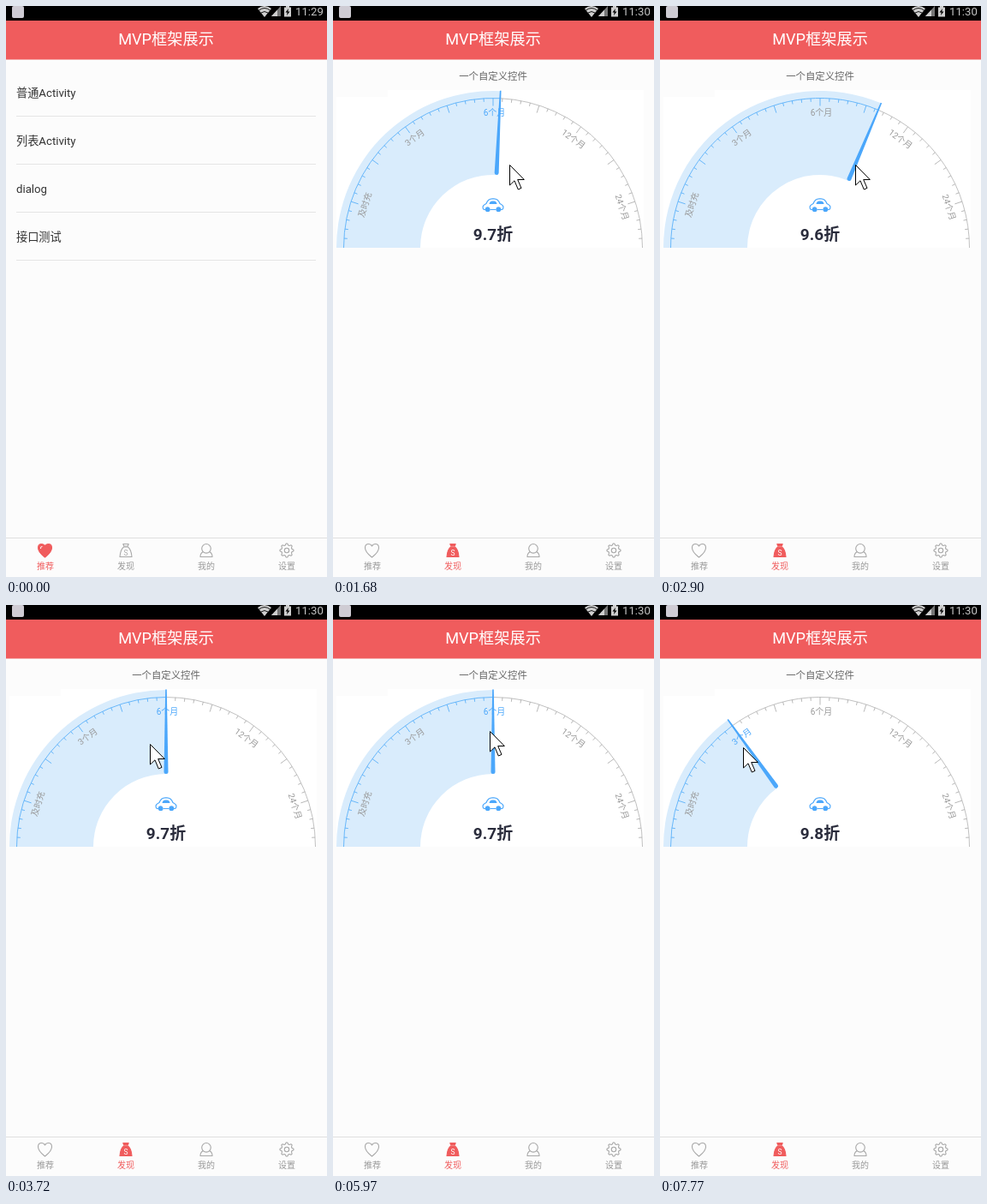
An HTML page for the animation above (8000 ms loop, 375 px wide and 666 px high).

```html
<!DOCTYPE html>
<html lang="zh-CN">
<head>
<meta charset="utf-8">
<title>MVP框架展示</title>
<style>
  html, body { margin: 0; width: 100%; height: 100%; overflow: hidden; background: #fcfcfc; }
  svg { display: block; width: 100%; height: 100%; }
  text { font-family: Roboto, "Noto Sans CJK SC", "Noto Sans CJK", sans-serif; }
  .mid { text-anchor: middle; }
  .icon { fill: none; stroke: #a8a8a8; stroke-width: 1.1; stroke-linejoin: round; stroke-linecap: round; }
  .tab text { font-size: 10px; fill: #999; text-anchor: middle; }
  .tab .glyph { font-size: 8.5px; fill: #a8a8a8; stroke: none; }
  .tab.on .icon { stroke: #f05c5d; }
  .tab.on .body { fill: #f05c5d; }
  .tab.on text { fill: #f05c5d; }
  .tab.on .glyph { fill: #fff; }
  .shine { stroke: none; }
  .tab.on .shine { stroke: #fff; }
</style>
</head>
<body>
<svg viewBox="0 0 375 666">
  <rect width="375" height="666" fill="#fcfcfc"/>

  <g id="listPage"></g>

  <g id="gaugePage">
    <text class="mid" x="187" y="86" font-size="11.4" fill="#666">一个自定义控件</text>
    <path d="M4 106H64V98H363V282H4Z" fill="#fff"/>
    <path id="fan" fill="#d9ecfc"/>
    <path id="restArc" fill="none" stroke="#b0b0b0" stroke-width=".8"/>
    <path id="doneArc" fill="none" stroke="#5cb2fa" stroke-width=".9"/>
    <g id="ticks" stroke-width=".9"></g>
    <g id="labels" font-size="10" class="mid"></g>
    <path id="needle" fill="#4ba7fb"/>
    <g transform="translate(187 232)" fill="none" stroke="#4ba7fb" stroke-width="1.2" stroke-linejoin="round">
      <path d="M-9 5.500H-10.500Q-12 5 -12 2.500Q-11.500 0 -8 -1.500Q-6 -7.200 -1 -7.200H1Q6 -7.200 8 -1.500Q11.500 0 12 2.500Q12 5 10.500 5.500H9M-3.500 5.500H3.500"/>
      <path d="M-4.500 -1Q-4 -4.500 -1 -4.500H1Q4 -4.500 4.500 -1Z" fill="#4ba7fb" stroke="none"/>
      <circle cx="-6.300" cy="5.200" r="2.300" fill="#4ba7fb"/>
      <circle cx="6.300" cy="5.200" r="2.300" fill="#4ba7fb"/>
    </g>
    <text id="rate" class="mid" x="187" y="273" font-size="19" font-weight="700" fill="#2a2c3c"></text>
  </g>

  <rect width="375" height="17" fill="#000"/>
  <rect x="7" y="0" width="14" height="14" rx="2" fill="#cfccd4"/>
  <g fill="#cfcfcf">
    <path d="M294 3Q302 -3 310 3L302 13Z"/>
    <path d="M295.500 5Q302 0 308.500 5M298 8Q302 5 306 8" fill="none" stroke="#000" stroke-width=".9"/>
    <path d="M310 12L321 0V12Z" fill="#777"/>
    <path d="M310 12L317 4.500V12Z"/>
    <path d="M327 0H331V1.500H333V12.500H325V1.500H327Z"/>
    <path d="M330 3L326.500 7.500H328.700L328 11L331.500 6.500H329.300Z" fill="#000"/>
  </g>
  <text id="clock" x="338" y="11" font-size="13.2" fill="#c4c4c4"></text>

  <rect y="17" width="375" height="45.500" fill="#f05c5d"/>
  <text class="mid" x="187" y="45" font-size="18.2" fill="#fff">MVP框架展示</text>

  <rect y="620" width="375" height="1" fill="#dfdfdf"/>
  <g class="tab" id="tab0">
    <g class="icon" transform="translate(45.500 635)">
      <path class="body" d="M0 8C-3 5.500 -8 2 -8 -3C-8 -6 -6 -7.500 -4 -7.500C-2 -7.500 -.7 -6.500 0 -5C.7 -6.500 2 -7.500 4 -7.500C6 -7.500 8 -6 8 -3C8 2 3 5.500 0 8Z"/>
      <path class="shine" d="M-5 -2.500Q-5 -4.500 -3.500 -4.500"/>
    </g>
    <text x="46" y="656.500">推荐</text>
  </g>
  <g class="tab" id="tab1">
    <g class="icon" transform="translate(140 635)">
      <path class="body" d="M-3.200 -7.500H3.200L2.200 -5H-2.200Z"/>
      <path class="body" d="M-2.500 -4C-5 -2 -6.500 1 -7 7.500H7C6.500 1 5 -2 2.500 -4Z"/>
      <text class="glyph" y="5.500">S</text>
    </g>
    <text x="140" y="656.500">发现</text>
  </g>
  <g class="tab">
    <g class="icon" transform="translate(234 635)">
      <circle cy="-2.200" r="5.300"/>
      <path d="M-4 1.800Q-7 3.500 -7 7.500H7Q7 3.500 4 1.800"/>
    </g>
    <text x="234" y="656.500">我的</text>
  </g>
  <g class="tab">
    <g class="icon" transform="translate(328 635)">
      <path id="gear"/>
      <circle r="2.700"/>
    </g>
    <text x="328" y="656.500">设置</text>
  </g>

  <path id="cursor" d="M.5 .5V24L6 18.800L10.300 29L14 27.400L9.700 17.500H17.300Z" fill="#fff" stroke="#000"/>
</svg>

<script>
const LOOP = 8000, OPEN = 990, REFRESH = 138;
const CX = 187, CY = 282, OUTER = 183, RING = 174.5, INNER = 85, LABEL_R = 158;
const SECTOR = 36, LAG = 138, SETTLE = 350;
const BLUE = '#4ba7fb';
const NAMES = ['及时充', '3个月', '6个月', '12个月', '24个月'];

// Pointer route: time, x, y
const ROUTE = [
  [990, 144, 620], [1540, 192, 187], [1680, 206, 185], [2600, 228, 185],
  [2920, 228, 185], [3050, 214, 186], [3750, 168, 162], [4150, 156, 151],
  [4990, 182, 146], [5130, 169, 146], [5970, 183, 147], [6510, 156, 150],
  [6648, 147, 153], [6960, 135, 173], [7500, 54, 153], [7750, 97, 166]
];
// Needle held by the pointer: grab and drop times
const DRAGS = [[1560, 3050], [4430, 5400], [6500, 6960]];

const $ = id => document.getElementById(id);
const set = (el, attrs) => { for (const k in attrs) el.setAttribute(k, attrs[k]); return el; };
const add = (parent, tag, attrs, text = '') => {
  const el = set(document.createElementNS('http://www.w3.org/2000/svg', tag), attrs);
  el.textContent = text;
  return parent.appendChild(el);
};
const clamp = v => Math.min(1, Math.max(0, v));
const mix = (a, b, p) => a + (b - a) * p;
const ease = p => { p = clamp(p); return p * p * (3 - 2 * p); };

// Point at radius r, angle clockwise from the top, shifted sideways
const at = (r, deg, side = 0) => {
  const a = deg * Math.PI / 180, s = Math.sin(a), c = Math.cos(a);
  return (CX + r * s + side * c).toFixed(2) + ' ' + (CY - r * c + side * s).toFixed(2);
};
const arc = (r, from, to) => `M${at(r, from)}A${r} ${r} 0 0 1 ${at(r, to)}`;

['普通Activity', '列表Activity', 'dialog', '接口测试'].forEach((name, i) => {
  add($('listPage'), 'text', { x: 12, y: 105.5 + i * 56, 'font-size': 13.2, fill: '#333' }, name);
  add($('listPage'), 'rect', { x: 12, y: 128 + i * 56, width: 350, height: 1, fill: '#e5e5e5' });
});

const ticks = [];
for (let i = -24; i <= 24; i++) {
  const deg = i * SECTOR / 10, len = i % 5 ? 4 : 9;
  ticks.push({ deg, el: add($('ticks'), 'path', { d: `M${at(RING, deg)}L${at(RING - len, deg)}` }) });
}

const labels = NAMES.map((name, i) => add($('labels'), 'text', {
  x: CX + 1.5, y: CY - LABEL_R + 3.7, transform: `rotate(${(i - 2) * SECTOR} ${CX} ${CY})`
}, name));

const teeth = [];
for (let i = 0; i < 32; i++) {
  const a = (i - 0.5) * Math.PI / 16, r = i % 4 < 2 ? 8 : 6.2;
  teeth.push((r * Math.sin(a)).toFixed(2) + ' ' + (-r * Math.cos(a)).toFixed(2));
}
set($('gear'), { d: 'M' + teeth.join('L') + 'Z' });

function pointer(t) {
  const i = ROUTE.findIndex(k => k[0] > t);
  if (i < 1) return ROUTE.at(i).slice(1);
  const [t0, x0, y0] = ROUTE[i - 1], [t1, x1, y1] = ROUTE[i], p = (t - t0) / (t1 - t0);
  return [mix(x0, x1, p), mix(y0, y1, p)];
}

function aim(t) {
  const [x, y] = pointer(t);
  return Math.atan2(x - CX, CY - y) * 180 / Math.PI;
}

// Trails the pointer while held, then settles on the nearest label
function needle(t) {
  let rest = 0, deg = 0;
  for (const [grab, drop] of DRAGS) {
    if (t < grab) break;
    const end = Math.min(t, drop);
    const held = mix(rest, aim(end - LAG), clamp((end - grab) / LAG));
    if (t < drop) return { deg: held, mark: t < grab + LAG ? rest : null };
    rest = Math.round(aim(drop) / SECTOR) * SECTOR;
    deg = mix(held, rest, ease((t - drop) / SETTLE));
  }
  return { deg, mark: rest };
}

function draw(t) {
  const open = t >= OPEN;
  $('listPage').style.display = open ? 'none' : '';
  $('gaugePage').style.display = $('cursor').style.display = open ? '' : 'none';
  $('tab0').classList.toggle('on', !open);
  $('tab1').classList.toggle('on', open);
  $('clock').textContent = open ? '11:30' : '11:29';

  const [x, y] = pointer(t).map(Math.round), { deg, mark } = needle(t);
  set($('cursor'), { transform: `translate(${x} ${y})` });
  set($('fan'), {
    d: `${arc(OUTER, -90, deg)}L${at(INNER, deg)}A${INNER} ${INNER} 0 0 0 ${at(INNER, -90)}Z`
  });
  set($('doneArc'), { d: arc(RING, -90, deg) });
  set($('restArc'), { d: arc(RING, deg, 90) });
  const r = INNER + 2.5;
  set($('needle'), {
    d: `M${at(OUTER + 0.5, deg, -0.8)}L${at(OUTER + 0.5, deg, 0.8)}L${at(r, deg, 2.5)}` +
       `A2.5 2.5 0 0 1 ${at(r, deg, -2.5)}Z`
  });
  for (const tick of ticks) set(tick.el, { stroke: tick.deg <= deg ? '#5cb2fa' : '#b0b0b0' });
  labels.forEach((el, i) => set(el, { fill: mark === (i - 2) * SECTOR ? BLUE : '#999' }));
  $('rate').textContent = (9.7 - Math.round(deg / SECTOR) / 10).toFixed(1) + '折';
}

let shown = -1;
const start = performance.now();
function frame(now) {
  const t = Math.max(0, now - start) % LOOP;
  const step = t < OPEN ? 0 : OPEN + Math.floor((t - OPEN) / REFRESH + 0.25) * REFRESH;
  if (step !== shown) draw(shown = step);
  requestAnimationFrame(frame);
}
frame(start);
</script>
</body>
</html>
```
